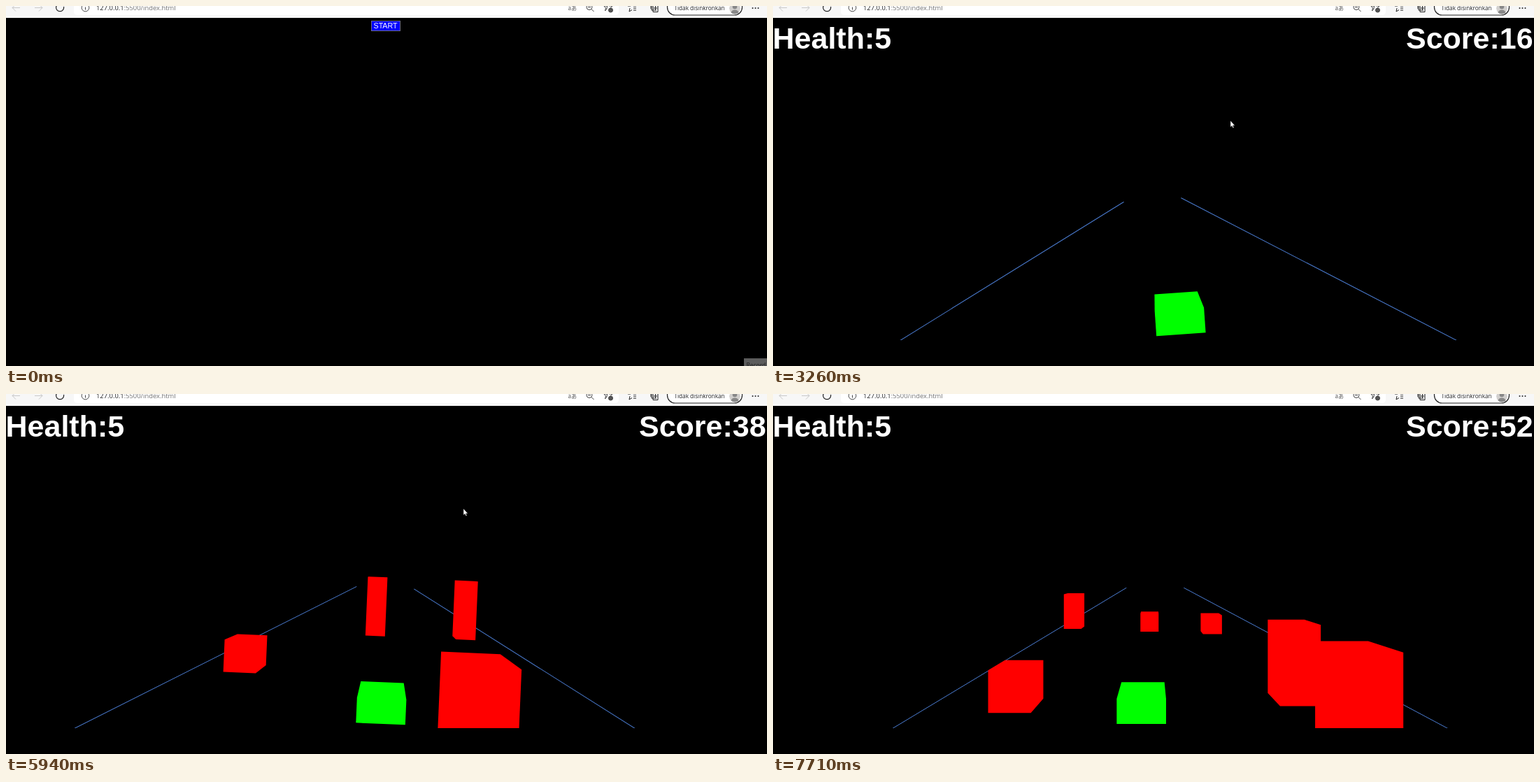
Animation, 1088 px wide and 515 px high, one loop 7770 ms. Source, as an HTML page:

```html
<!DOCTYPE html>
<html lang="en">
<head>
<meta charset="utf-8">
<title>Dodge</title>
<style>
  html, body { margin: 0; width: 100%; height: 100%; overflow: hidden; background: #000; }
  svg { display: block; width: 1088px; height: 515px; }
  .ui { font-family: "Open Sans", "Noto Sans", sans-serif; }
  .hud { font: bold 43px "Liberation Sans", Arial, sans-serif; fill: #fff; }
  .icon { fill: none; stroke: #444; stroke-width: 1; }
</style>
</head>
<body>
<svg viewBox="0 0 1088 515">
  <defs>
    <clipPath id="view"><rect x="77" y="30" width="934" height="448"/></clipPath>
    <clipPath id="avatar"><circle cx="1042" cy="3.5" r="8"/></clipPath>
  </defs>
  <rect width="1088" height="515"/>

  <g id="menu">
    <rect id="button" x="522.5" y="21.5" width="41" height="14" fill="#00f" stroke="#6a6a8c"/>
    <text x="525.5" y="32.3" font-size="10.7" font-family="Liberation Sans, Arial, sans-serif" fill="#fff">START</text>
  </g>

  <g id="game">
    <g clip-path="url(#view)">
      <g id="world">
        <path id="road" fill="none" stroke="#4a7bd0"/>
        <path id="far" fill="#f00"/>
        <path id="player" fill="#0f0"/>
        <path id="near" fill="#f00"/>
      </g>
    </g>
    <text class="hud" x="-.5" y="61.2">Health:5</text>
    <text class="hud" x="905" y="61.2" id="score">Score:0</text>
  </g>

  <g class="ui">
    <rect width="1088" height="17" fill="#f7f7f7"/>
    <path d="M97 0H876V8Q876 13 871 13H102Q97 13 97 8Z" fill="#fff"/>
    <g class="icon">
      <path d="M20 2.5H9M14 -2.5L9 2.5L14 7.5M41 2.5H52M47 -2.5L52 2.5L47 7.5" stroke="#c8c8c8"/>
      <path d="M82.5 1A5.5 5.5 0 1 1 79 -3" stroke="#222" stroke-width="1.2"/>
      <circle cx="113.5" cy="2.5" r="5.3"/>
      <path d="M113.5 1.5V5.5M113.5 -1V0"/>
      <circle cx="834" cy="1.5" r="4"/>
      <path d="M837 4.5L840.5 8M832 1.5H836"/>
      <path d="M861 -4L862.5 0H867L864 3M859 4L856.5 7L857.5 3L855 0H859.5Z"/>
      <circle cx="864.5" cy="6" r="3" fill="#555"/>
      <path d="M889 0H893L895 -4L897 0H901M892 3L891 8L895 5.5M897 3H901M897 6H901" stroke="#222"/>
      <path d="M923 -2V6H930M922 -4V4M925 -3H932V8.5H925ZM928.5 0V6M926 3H931" stroke="#222"/>
      <rect x="945.5" y="-10" width="107" height="23" rx="11" fill="#fff" stroke="#222" stroke-width="1.2"/>
    </g>
    <g clip-path="url(#avatar)">
      <circle cx="1042" cy="3.5" r="8" fill="#d2d0ce"/>
      <circle cx="1042" cy="1" r="3.3" fill="#888"/>
      <ellipse cx="1042" cy="10" rx="5.5" ry="4.5" fill="#888"/>
    </g>
    <g fill="#222"><circle cx="1067.5" cy="3" r="1"/><circle cx="1071.5" cy="3" r="1"/><circle cx="1075.5" cy="3" r="1"/></g>
    <text x="129" y="6.3" font-size="9.4" fill="#222">127.0.0.1<tspan fill="#707070">:5500/index.html</tspan></text>
    <text x="803.5" y="6" font-size="8" fill="#555" style="font-family:'Noto Sans CJK JP','Noto Sans CJK',sans-serif">aあ</text>
    <text x="955.5" y="6" font-size="8.2" fill="#222">Tidak disinkronkan</text>
  </g>

  <g id="tip" class="ui">
    <rect x="1055" y="504" width="33" height="11" fill="#5c5c5c"/>
    <text x="1058.5" y="517" font-size="8.5" fill="#1c1c1c">Record</text>
  </g>
  <path id="pointer" d="M0 0V9.2L2.1 7.4L3.6 10.6L5 10L3.6 6.9H6.3Z" fill="#fff" stroke="#000" stroke-width=".4"/>
</svg>

<script>
// World lengths are in camera heights; z is the inverse of a ground point's
// distance below the horizon in pixels.
const LOOP = 7770, GAME_START = 1370;
const CENTER = [543.8, 254];
const ROAD = 1.7685, SIZE = 0.302, DEPTH = 5.6e-4;
const SPAWN = 0.0142, GONE = 0.0016, PLAYER_Z = 0.0046, SPEED = 8.9e-6;
const LEFT = -0.107, RIGHT = 0.226, STEER = 9e-4;
const MAX_ROLL = 4, ROLL_WINDOW = 60;

// Steering flips at each of these times, first to the left
const turns = [1600, 2000, 2461, 3000, 3500, 3997, 4145, 4550, 4956, 5723, 5904, 6400, 6910];

// Spawn time, x, height in cubes
const blocks = [
  [1607, .722, 3], [3432, .895, 1], [4489, -.892, 1], [4683, .47, 2], [5078, -1.305, 1],
  [5558, -.107, 3], [5558, 1.29, 3], [6500, .965, 2], [6671, -1.124, 1],
  [6699, .985, 2], [7370, .837, 1], [7421, -.171, 1], [7485, -1.516, 2]
];

// Time, tip x, tip y
const mouse = [
  [20, 1066, 508], [770, 617, 95], [1050, 534, 28], [1400, 534, 28],
  [2100, 654, 164], [6780, 654, 164], [7400, 820, 520]
];

const el = id => document.getElementById(id);
const show = (id, on) => el(id).setAttribute("display", on ? "inline" : "none");
const clamp = (v, lo, hi) => Math.min(hi, Math.max(lo, v));

function pointerAt(t) {
  const i = mouse.findIndex(k => k[0] > t);
  if (i < 1) return mouse[i < 0 ? mouse.length - 1 : 0].slice(1);
  const [t0, x0, y0] = mouse[i - 1], [t1, x1, y1] = mouse[i];
  const u = ((t - t0) / (t1 - t0)) ** 2;
  return [x0 + (x1 - x0) * u, y0 + (y1 - y0) * u];
}

function cameraAt(t) {
  return turns.reduce((x, start, i) => {
    const held = clamp(t, start, turns[i + 1] ?? LOOP) - start;
    return clamp(x + (i % 2 ? 1 : -1) * STEER * held, LEFT, RIGHT);
  }, 0);
}

// The view banks with the sideways speed averaged over a short window
function rollAt(t) {
  const moved = cameraAt(t + ROLL_WINDOW) - cameraAt(t - ROLL_WINDOW);
  return -MAX_ROLL * moved / (2 * ROLL_WINDOW * STEER);
}

// Convex outline as path data
function outline(points) {
  points.sort((p, q) => p[0] - q[0] || p[1] - q[1]);
  const half = list => {
    const out = [];
    for (const p of list) {
      while (out.length > 1) {
        const [a, b] = out.slice(-2);
        if ((b[0] - a[0]) * (p[1] - a[1]) > (b[1] - a[1]) * (p[0] - a[0])) break;
        out.pop();
      }
      out.push(p);
    }
    return out.slice(0, -1);
  };
  const hull = half(points).concat(half(points.slice().reverse()));
  return "M" + hull.map(p => p.map(v => v.toFixed(2)).join(" ")).join("L") + "Z";
}

// Front face given in pixels; the back face is the same one scaled toward the center
function box(left, right, top, bottom, shrink) {
  const front = [[left, top], [right, top], [right, bottom], [left, bottom]];
  return outline(front.concat(front.map(p => p.map(v => v * shrink))));
}

function blockPath({ x, n, z }, cam) {
  const s = 1 / z, mid = x - cam;
  return box((mid - SIZE / 2) * s, (mid + SIZE / 2) * s, (1 - n * SIZE) * s, s, z / (z + DEPTH));
}

function drawGame(t) {
  const cam = cameraAt(t), roll = rollAt(t);
  el("world").setAttribute("transform", `translate(${CENTER}) rotate(${roll})`);

  const side = k => `M${k * 23.2} 23.2L${k * 420} 420`;
  el("road").setAttribute("d", side(-ROAD - cam) + side(ROAD - cam));

  const live = blocks
    .map(([start, x, n]) => ({ x, n, z: SPAWN - (t - start) * SPEED }))
    .filter(b => b.z <= SPAWN && b.z > GONE);
  const paths = test => live.filter(test).map(b => blockPath(b, cam)).join("");
  el("far").setAttribute("d", paths(b => b.z >= PLAYER_Z));
  el("near").setAttribute("d", paths(b => b.z < PLAYER_Z));

  const px = 160 * cam - roll;
  el("player").setAttribute("d", box(px - 35.3, px + 35.3, 182, 218, .87));
  el("score").textContent = "Score:" + Math.floor((t - 1319) / 121);
}

function draw(t) {
  const playing = t >= GAME_START;
  show("menu", !playing);
  show("game", playing);
  show("tip", t < 100);
  show("pointer", t >= 20 && t < 7400);
  el("button").setAttribute("stroke", t >= 1210 ? "#fff" : "#6a6a8c");
  el("pointer").setAttribute("transform", `translate(${pointerAt(t)})`);
  if (playing) drawGame(t);
}

const origin = performance.now();
function tick() {
  draw((performance.now() - origin) % LOOP);
  requestAnimationFrame(tick);
}
draw(0);
requestAnimationFrame(tick);
</script>
</body>
</html>
```
